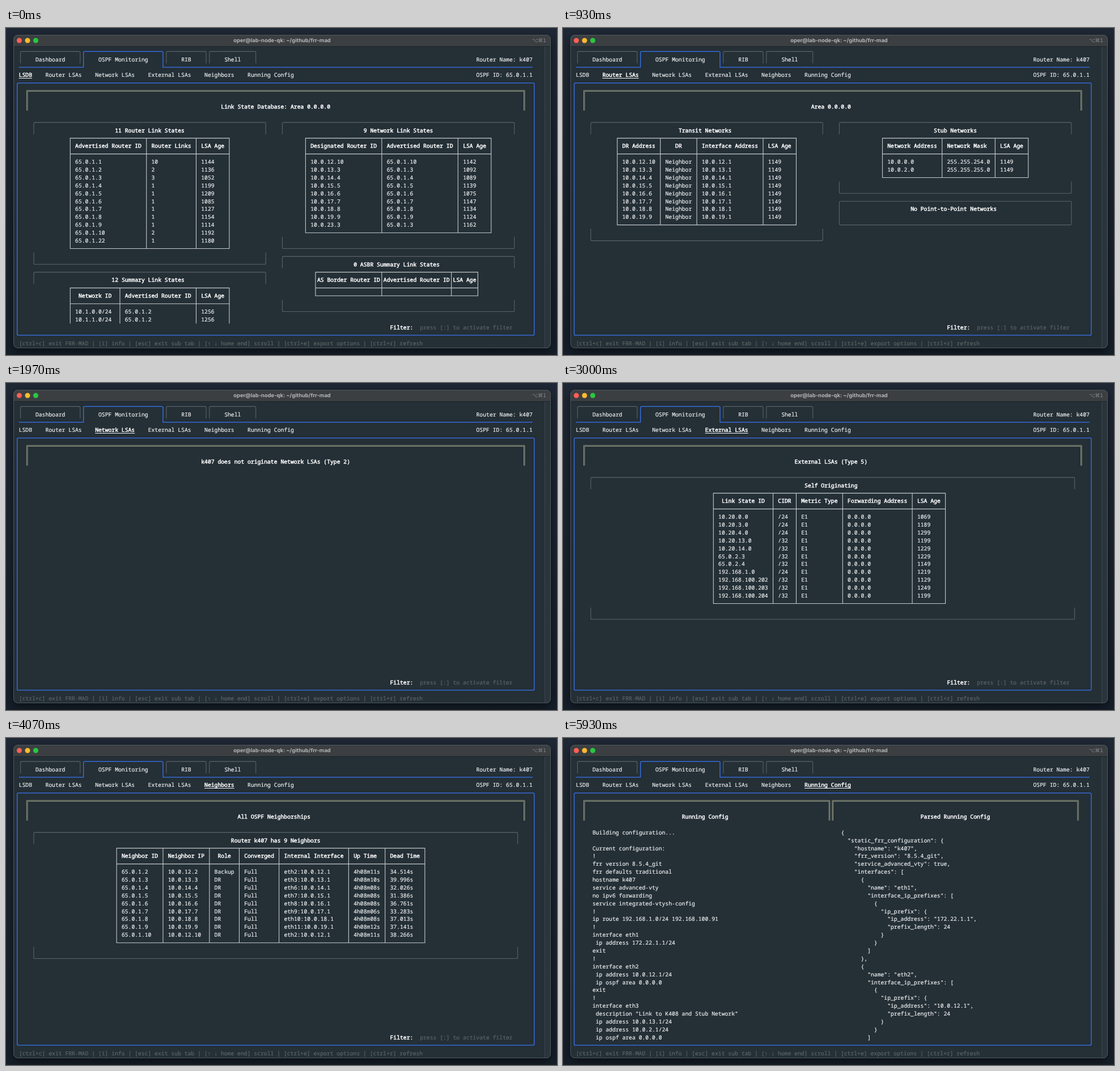
An HTML page that plays this animation: 972x576 px, repeating every 6.13 s.

```html
<!DOCTYPE html>
<html lang="en">
<head>
<meta charset="utf-8">
<title>Terminal: OSPF monitoring</title>
<style>
  html, body { margin: 0; width: 100%; height: 100%; overflow: hidden; background: #18212c; }
  svg { display: block; width: 100vw; height: 100vh; }
  text {
    font: 9.745px "Noto Sans Mono", "DejaVu Sans Mono", monospace;
    color: #eef0f0; fill: currentColor; stroke: currentColor; stroke-width: .2px;
    white-space: pre; text-rendering: geometricPrecision;
  }
  .bold { color: #fff; stroke-width: .5px; }
  .dim { color: #5c6468; }
  .bar { font: 700 9.4px Inter, sans-serif; color: #b3b5b6; stroke: none; text-anchor: middle; }
  .keys { font: 9px "DejaVu Sans", sans-serif; color: #868a8c; stroke: none; text-anchor: end; }
  path { fill: none; stroke-width: 1.1; }
  .grid { stroke: #c6cbcd; }
  .group { stroke: #596368; }
  .blue { stroke: #3a74f0; stroke-width: 1.3; }
  .gold { stroke: #dcdbb0; stroke-width: .6; }
  .under { stroke: #f4f4f4; stroke-width: 1; }
  .screen { visibility: hidden; }
</style>
</head>
<body>
<svg id="stage" viewBox="0 0 972 576" preserveAspectRatio="none">
  <defs>
    <linearGradient id="desk" x2="0" y2="1">
      <stop offset="0" stop-color="#1f2835"/>
      <stop offset="1" stop-color="#161f2a"/>
    </linearGradient>
    <filter id="shadow" x="-10%" y="-10%" width="120%" height="125%">
      <feGaussianBlur stdDeviation="9"/>
    </filter>
    <clipPath id="frame"><rect x="13" y="12" width="948" height="552" rx="8"/></clipPath>
  </defs>
  <rect width="972" height="576" fill="url(#desk)"/>
  <rect x="13" y="18" width="948" height="552" rx="8" fill="#000" opacity=".5" filter="url(#shadow)"/>
  <g clip-path="url(#frame)">
    <rect x="13" y="12" width="948" height="552" fill="#242f36"/>
    <rect x="950" y="32" width="11" height="532" fill="#2a343b"/>
    <path d="M950.5 32V564" stroke="#3b454b"/>
    <rect x="13" y="12" width="948" height="20" fill="#3c3f41"/>
    <path d="M13 32.5H961" stroke="#1c2429"/>
  </g>
  <rect x="13.5" y="12.5" width="947" height="551" rx="7.5" fill="none" stroke="#4f585e"/>
  <circle cx="23.5" cy="22" r="4.5" fill="#ff5f57"/>
  <circle cx="38" cy="22" r="4.5" fill="#febc2e"/>
  <circle cx="52.5" cy="22" r="4.5" fill="#28c840"/>
  <text class="bar" x="487" y="25">oper@lab-node-qk: ~/github/frr-mad</text>
  <text class="keys" x="953" y="24.5">⌥⌘1</text>
</svg>
<script>
const LOOP = 6130;
const HOST = 'k407';
const stage = document.getElementById('stage');
let layer = stage;

// Terminal grid: left edge and middle of a column, middle of a row
const X = c => 16.8 + 5.847 * c;
const mid = c => X(c + .5);
const Y = r => 96.9 + 13.885 * r;

function add(tag, attrs, content = '') {
  const el = document.createElementNS('http://www.w3.org/2000/svg', tag);
  for (const k in attrs) el.setAttribute(k, attrs[k]);
  el.textContent = content;
  layer.appendChild(el);
  return el;
}
const line = (cls, d) => add('path', { class: cls, d });
const write = (c, r, s, cls = '') =>
  add('text', { class: cls, x: X(c).toFixed(2), y: (Y(r) + 3.4).toFixed(2) }, s);
const block = (c, r, s) => s.split('\n').forEach((t, i) => t && write(c, r + i, t));
const centred = (c1, c2, r, s) =>
  write(c1 + 1 + Math.floor((c2 - c1 - 1 - s.length) / 2), r, s, 'bold');

// Rounded bracket from row `open` to the closing edge at row `edge`
function bracket(cls, c1, c2, edge, open) {
  const l = mid(c1), r = mid(c2), y = Y(edge), k = open > edge ? 2 : -2;
  line(cls, `M${l} ${Y(open)}V${y + k}Q${l} ${y} ${l + 2} ${y}H${r - 2}Q${r} ${y} ${r} ${y + k}V${Y(open)}`);
}

function group(c1, c2, r1, r2, title) {
  bracket('group', c1, c2, r1, r1 + 1.5);
  if (r2) bracket('group', c1, c2, r2, r2 - 1.5);
  centred(c1, c2, r1 + 1, title);
}

function banner(c1, c2, title) {
  for (const o of [-.8, .8]) {
    line('gold', `M${mid(c1) + o} ${Y(3.5)}V${Y(1) + o}H${mid(c2) - o}V${Y(3.5)}`);
  }
  centred(c1, c2, 3, title);
}

// Rows are given as text lines with cells split by spaces
function table(c, r, heads, body, { pad = 1, cut = false } = {}) {
  const rows = body ? body.split('\n').map(s => s.trim().split(' ')) : [];
  const end = r + 3 + rows.length;
  const bottom = Y(cut ? end - .5 : end);
  let at = c, d = '';
  heads.forEach((h, i) => {
    const w = Math.max(h.length, ...rows.map(x => x[i].length)) + 2 * pad;
    d += `M${mid(at)} ${Y(r)}V${bottom}`;
    centred(at, at + w + 1, r + 1, h);
    rows.forEach((x, j) => write(at + 1 + pad, r + 3 + j, x[i]));
    at += w + 1;
  });
  d += `M${mid(at)} ${Y(r)}V${bottom}`;
  for (const y of cut ? [r, r + 2] : [r, r + 2, end]) d += `M${mid(c) - .5} ${Y(y)}H${mid(at) + .5}`;
  line('grid', d);
}

function chrome() {
  for (const [l, r, name] of [[1, 19, 'Dashboard'], [45, 57, 'RIB'], [58, 72, 'Shell']]) {
    bracket('group', l, r, -4, -2.5);
    write(l + 5, -3, name);
  }
  const a = mid(20), b = mid(44), top = Y(-4), base = Y(-2);
  line('blue', `M${X(1)} ${base}H${a}V${top + 2}Q${a} ${top} ${a + 2} ${top}H${b - 2}Q${b} ${top} ${b} ${top + 2}V${base}H${X(156)}`);
  write(25, -3, 'OSPF Monitoring');
  write(139, -3, 'Router Name: ' + HOST);
  write(139, -1, 'OSPF ID: 65.0.1.1');
  bracket('blue', 0, 156, 0, 16);
  bracket('blue', 0, 156, 32, 16);
  write(1, 33, '[ctrl+c] exit FRR-MAD | [i] info | [esc] exit sub tab | [↑ ↓ home end] scroll | [ctrl+e] export options | [ctrl+r] refresh', 'dim');
}

const tabs = [[1, 'LSDB'], [9, 'Router LSAs'], [24, 'Network LSAs'],
  [40, 'External LSAs'], [57, 'Neighbors'], [70, 'Running Config']];

function subTabs(active) {
  tabs.forEach(([c, name], i) => {
    write(c, -1, name, i === active ? 'bold' : '');
    if (i === active) line('under', `M${X(c)} 88.5H${X(c + name.length)}`);
  });
}

function filter() {
  write(113, 31, 'Filter:', 'bold');
  write(122, 31, 'press [:] to activate filter', 'dim');
}

function lsdb() {
  banner(3, 153, 'Link State Database: Area 0.0.0.0');
  group(5, 75, 5, 23, '11 Router Link States');
  table(16, 7, ['Advertised Router ID', 'Router Links', 'LSA Age'],
    `65.0.1.1 10 1144
    65.0.1.2 2 1136
    65.0.1.3 3 1052
    65.0.1.4 1 1199
    65.0.1.5 1 1209
    65.0.1.6 1 1085
    65.0.1.7 1 1127
    65.0.1.8 1 1154
    65.0.1.9 1 1114
    65.0.1.10 2 1192
    65.0.1.22 1 1180`);
  group(5, 75, 24, 0, '12 Summary Link States');
  table(16, 26, [' Network ID ', 'Advertised Router ID', 'LSA Age'],
    `10.1.0.0/24 65.0.1.2 1256
    10.1.1.0/24 65.0.1.2 1256`, { cut: true });
  group(80, 150, 5, 21, '9 Network Link States');
  table(87, 7, ['Designated Router ID', 'Advertised Router ID', 'LSA Age'],
    `10.0.12.10 65.0.1.10 1142
    10.0.13.3 65.0.1.3 1092
    10.0.14.4 65.0.1.4 1089
    10.0.15.5 65.0.1.5 1139
    10.0.16.6 65.0.1.6 1075
    10.0.17.7 65.0.1.7 1147
    10.0.18.8 65.0.1.8 1134
    10.0.19.9 65.0.1.9 1124
    10.0.23.3 65.0.1.3 1162`);
  group(80, 150, 22, 29, '0 ASBR Summary Link States');
  table(90, 24, ['AS Border Router ID', 'Advertised Router ID', 'LSA Age'], '', { pad: 0 });
  filter();
}

function routerLsas() {
  banner(3, 153, 'Area 0.0.0.0');
  group(5, 75, 5, 20, 'Transit Networks');
  const peers = ['12.10', '13.3', '14.4', '15.5', '16.6', '17.7', '18.8', '19.9'];
  table(13, 7, ['DR Address', 'DR', 'Interface Address', 'LSA Age'],
    peers.map(p => `10.0.${p} Neighbor 10.0.${p.split('.')[0]}.1 1149`).join('\n'));
  group(80, 150, 5, 14, 'Stub Networks');
  table(93, 7, ['Network Address', 'Network Mask', 'LSA Age'],
    `10.0.0.0 255.255.254.0 1149
    10.0.2.0 255.255.255.0 1149`);
  group(80, 150, 15, 18, 'No Point-to-Point Networks');
  filter();
}

function networkLsas() {
  banner(3, 153, HOST + ' does not originate Network LSAs (Type 2)');
  filter();
}

function externalLsas() {
  banner(3, 153, 'External LSAs (Type 5)');
  group(5, 151, 5, 23, 'Self Originating');
  table(42, 7, ['Link State ID', 'CIDR', 'Metric Type', 'Forwarding Address', 'LSA Age'],
    `10.20.0.0 /24 1069
    10.20.3.0 /24 1189
    10.20.4.0 /24 1299
    10.20.13.0 /32 1199
    10.20.14.0 /32 1229
    65.0.2.3 /32 1229
    65.0.2.4 /32 1149
    192.168.1.0 /24 1219
    192.168.100.202 /32 1129
    192.168.100.203 /32 1249
    192.168.100.204 /32 1199`.replace(/(\/\d+)/g, '$1 E1 0.0.0.0'));
  filter();
}

function neighbors() {
  banner(3, 153, 'All OSPF Neighborships');
  group(5, 151, 5, 21, `Router ${HOST} has 9 Neighbors`);
  table(30, 7, ['Neighbor ID', 'Neighbor IP', 'Role', 'Converged', 'Internal Interface', 'Up Time', 'Dead Time'],
    `65.0.1.2 10.0.12.2 Backup Full eth2:10.0.12.1 4h08m11s 34.514s
    65.0.1.3 10.0.13.3 DR Full eth3:10.0.13.1 4h08m10s 39.996s
    65.0.1.4 10.0.14.4 DR Full eth6:10.0.14.1 4h08m08s 32.026s
    65.0.1.5 10.0.15.5 DR Full eth7:10.0.15.1 4h08m08s 31.386s
    65.0.1.6 10.0.16.6 DR Full eth8:10.0.16.1 4h08m08s 36.761s
    65.0.1.7 10.0.17.7 DR Full eth9:10.0.17.1 4h08m06s 33.283s
    65.0.1.8 10.0.18.8 DR Full eth10:10.0.18.1 4h08m08s 37.013s
    65.0.1.9 10.0.19.9 DR Full eth11:10.0.19.1 4h08m12s 37.141s
    65.0.1.10 10.0.12.10 DR Full eth2:10.0.12.1 4h08m11s 38.266s`);
  filter();
}

function runningConfig() {
  banner(3, 77, 'Running Config');
  banner(78, 152, 'Parsed Running Config');
  block(6, 5, `Building configuration...

Current configuration:
!
frr version 8.5.4_git
frr defaults traditional
hostname ${HOST}
service advanced-vty
no ipv6 forwarding
service integrated-vtysh-config
!
ip route 192.168.1.0/24 192.168.100.91
!
interface eth1
 ip address 172.22.1.1/24
exit
!
interface eth2
 ip address 10.0.12.1/24
 ip ospf area 0.0.0.0
exit
!
interface eth3
 description "Link to K408 and Stub Network"
 ip address 10.0.13.1/24
 ip address 10.0.2.1/24
 ip ospf area 0.0.0.0`);
  const port = (name, ip) => `      {
        "name": "${name}",
        "interface_ip_prefixes": [
          {
            "ip_prefix": {
              "ip_address": "${ip}",
              "prefix_length": 24
            }
          }
        ]`;
  block(81, 5, `{
  "static_frr_configuration": {
    "hostname": "${HOST}",
    "frr_version": "8.5.4_git",
    "service_advanced_vty": true,
    "interfaces": [
${port('eth1', '172.22.1.1')}
      },
${port('eth2', '10.0.12.1')}`);
}

chrome();

const screens = [[0, lsdb], [930, routerLsas], [1830, networkLsas],
  [2870, externalLsas], [3900, neighbors], [4830, runningConfig]];
const percent = t => (t / LOOP * 100).toFixed(4) + '%';
let css = '';
screens.forEach(([start, draw], i) => {
  const end = i + 1 < screens.length ? screens[i + 1][0] : LOOP;
  layer = stage;
  layer = add('g', { class: 'screen', id: 'screen' + i });
  subTabs(i);
  draw();
  css += `@keyframes show${i} {
    ${start ? '0% { visibility: hidden }' : ''}
    ${percent(start)} { visibility: visible }
    ${end < LOOP ? percent(end) + ' { visibility: hidden }' : ''}
    100% { visibility: ${end < LOOP ? 'hidden' : 'visible'} }
  }
  #screen${i} { animation: show${i} ${LOOP}ms step-end infinite }`;
});
document.head.appendChild(document.createElement('style')).textContent = css;
</script>
</body>
</html>
```
